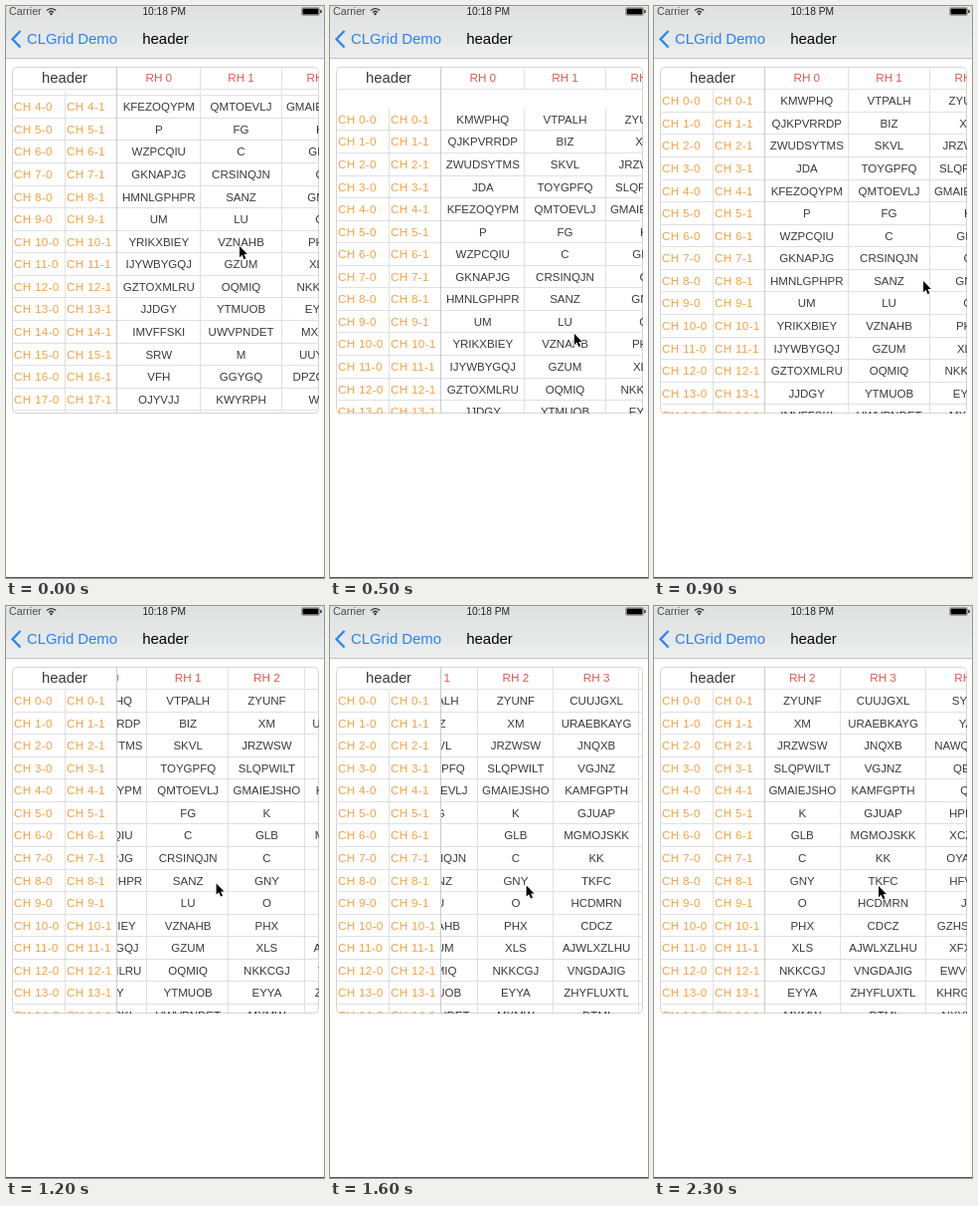
An HTML page with a canvas that plays this animation: 320x574 px, repeating every 2400 ms.

```html
<!DOCTYPE html>
<html lang="en">
<head>
<meta charset="utf-8">
<title>Grid demo</title>
<style>
html, body { margin: 0; width: 100%; height: 100%; overflow: hidden; background: #fff; }
canvas { display: block; width: 320px; height: 574px; }
</style>
</head>
<body>
<canvas id="stage"></canvas>
<script>
const W = 320, H = 574, LOOP = 2400, STEP = 100;
const canvas = document.getElementById('stage');
const ctx = canvas.getContext('2d');
const dpr = window.devicePixelRatio || 1;
canvas.width = W * dpr;
canvas.height = H * dpr;

const FONT = '"Liberation Sans", Arial, sans-serif';
const BLUE = '#2585f3', ORANGE = '#f3a346', RED = '#e2574e', INK = '#3a3a3a', LINE = '#e0e0e0';
const GRID = { x: 6, y: 61, r: 315, b: 409 };
const BODY_X = 112, BODY_Y = 84, ROW = 22.57, ROWS = 18, BASELINE = 15;
const EDGES = [112, 195.5, 277.5, 354, 440, 524];

const COLUMNS = [
  'KMWPHQ QJKPVRRDP ZWUDSYTMS JDA KFEZOQYPM P WZPCQIU GKNAPJG HMNLGPHPR UM YRIKXBIEY IJYWBYGQJ GZTOXMLRU JJDGY IMVFFSKI SRW VFH OJYVJJ',
  'VTPALH BIZ SKVL TOYGPFQ QMTOEVLJ FG C CRSINQJN SANZ LU VZNAHB GZUM OQMIQ YTMUOB UWVPNDET M GGYGQ KWYRPH',
  'ZYUNF XM JRZWSW SLQPWILT GMAIEJSHO K GLB C GNY O PHX XLS NKKCGJ EYYA MXMW UUYGH DPZCKOL WCI',
  'CUUJGXL URAEBKAYG JNQXB VGJNZ KAMFGPTH GJUAP MGMOJSKK KK TKFC HCDMRN CDCZ AJWLXZLHU VNGDAJIG ZHYFLUXTL DTMI',
  'SYGT YAI NAWQPGTB QEJL QJ HPEKJ XCZPJ OYAHW HFVPJ JT GZHSMOW XFXEF EWVGMW KHRGMOW NXYNALT'
].map(s => s.split(' '));

// time, x, y of the pointer tip
const POINTER = [
  [0, 235, 241], [200, 238, 357], [700, 251, 310], [900, 271, 276],
  [1400, 172, 280], [1900, 236, 281], [2300, 226, 281]
];

function scrollY(t) {
  if (t < 200) return 84 * (1 - Math.pow(t / 200, 1.5));
  // rubber band past the top edge
  const s = t - 200;
  return -Math.max(0, 0.82 * s * Math.exp(-s / 120) - 1.4 * Math.min(1, s / 200));
}

function scrollX(t) {
  if (t < 900) return 0;
  if (t < 1400) return 96 * Math.pow((t - 900) / 500, 1.15);
  const u = Math.min(1, (t - 1400) / 900);
  return 166.5 - 70.5 * Math.pow(1 - u, 2.5);
}

function pointerAt(t) {
  let i = 0;
  while (i < POINTER.length - 2 && t > POINTER[i + 1][0]) i++;
  const [t0, x0, y0] = POINTER[i], [t1, x1, y1] = POINTER[i + 1];
  const u = Math.min(1, (t - t0) / (t1 - t0));
  return [x0 + (x1 - x0) * u, y0 + (y1 - y0) * u];
}

function text(s, x, y, size, color, align = 'left', spacing = 0) {
  ctx.font = `${size}px ${FONT}`;
  ctx.letterSpacing = `${spacing}px`;
  ctx.textAlign = align;
  ctx.fillStyle = color;
  ctx.fillText(s, x, y);
}

function hline(x0, x1, y, color = LINE) {
  ctx.fillStyle = color;
  ctx.fillRect(x0, Math.round(y), x1 - x0, 1);
}

function vline(x, y0, y1, color = LINE) {
  ctx.fillStyle = color;
  ctx.fillRect(Math.round(x) - 1, y0, 1, y1 - y0);
}

function clipped(x, y, r, b, draw) {
  ctx.save();
  ctx.beginPath();
  ctx.rect(x, y, r - x, b - y);
  ctx.clip();
  draw();
  ctx.restore();
}

function gridPath() {
  ctx.beginPath();
  ctx.roundRect(GRID.x + 0.5, GRID.y + 0.5, GRID.r - GRID.x - 1, GRID.b - GRID.y - 1, 4);
}

function drawGrid(sx, sy) {
  const top = BODY_Y - sy;
  const bodyTop = Math.max(BODY_Y, top);
  const rowTop = i => top + i * ROW;
  const mid = c => (EDGES[c] + EDGES[c + 1]) / 2 - sx;

  gridPath();
  ctx.strokeStyle = '#d4d4d4';
  ctx.lineWidth = 1;
  ctx.stroke();

  // frozen row titles
  clipped(GRID.x, BODY_Y + 1, BODY_X, GRID.b, () => {
    for (let i = 0; i < ROWS; i++) {
      const y = rowTop(i);
      hline(GRID.x, BODY_X, y + ROW - 1);
      text(`CH ${i}-0`, 8, y + BASELINE, 11.7, ORANGE, 'left', 0.3);
      text(`CH ${i}-1`, 61, y + BASELINE, 11.7, ORANGE, 'left', 0.3);
    }
    vline(60, bodyTop, GRID.b - 1);
  });

  // scrolling cells
  clipped(BODY_X, BODY_Y + 1, GRID.r, GRID.b, () => {
    for (let i = 0; i < ROWS; i++) {
      const y = rowTop(i);
      hline(BODY_X, GRID.r, y + ROW - 1);
      COLUMNS.forEach((col, c) => text(col[i] || '', mid(c), y + BASELINE, 11.5, INK, 'center'));
    }
    EDGES.forEach(x => vline(x - sx, bodyTop, GRID.b - 1));
  });

  // column titles
  clipped(BODY_X, GRID.y, GRID.r, BODY_Y, () => {
    COLUMNS.forEach((_, c) => text(`RH ${c}`, mid(c), 76.3, 11.7, RED, 'center'));
    EDGES.forEach(x => vline(x - sx, GRID.y, BODY_Y));
  });
  text('header', 59, 77.3, 14.8, INK, 'center');
  hline(GRID.x, GRID.r, BODY_Y - 1);
  vline(BODY_X, GRID.y, GRID.b - 1, '#cbcbcb');
}

function drawBar() {
  const g = ctx.createLinearGradient(0, 0, 0, 52);
  g.addColorStop(0, '#e0e2e1');
  g.addColorStop(0.55, '#e5e6e6');
  g.addColorStop(1, '#eeefef');
  ctx.fillStyle = g;
  ctx.fillRect(0, 0, W, 52);
  hline(0, W, 52, '#c2c4c4');

  text('Carrier', 3, 9.3, 10.7, '#4c4c4c');
  text('10:18 PM', 159.2, 9.3, 10.2, '#222', 'center');

  // signal arcs
  ctx.strokeStyle = '#333';
  ctx.lineWidth = 1.4;
  for (const r of [3.2, 6]) {
    ctx.beginPath();
    ctx.arc(45.5, 8.6, r, -Math.PI * 0.77, -Math.PI * 0.23);
    ctx.stroke();
  }
  ctx.fillStyle = '#333';
  ctx.beginPath();
  ctx.arc(45.5, 8, 1.2, 0, Math.PI * 2);
  ctx.fill();

  // battery
  ctx.strokeStyle = '#777';
  ctx.lineWidth = 0.6;
  ctx.beginPath();
  ctx.roundRect(297.5, 1.5, 18, 8, 1.5);
  ctx.stroke();
  ctx.fillStyle = '#000';
  ctx.fillRect(298.5, 2.5, 16, 6);
  ctx.fillRect(316.3, 4, 1.2, 3);

  ctx.strokeStyle = BLUE;
  ctx.lineWidth = 2.2;
  ctx.beginPath();
  ctx.moveTo(14.5, 25);
  ctx.lineTo(6.5, 33.2);
  ctx.lineTo(14.5, 41.4);
  ctx.stroke();
  text('CLGrid Demo', 21, 38.3, 14.9, BLUE);
  text('header', 160.5, 38.3, 15, '#000', 'center');
}

function drawPointer(x, y) {
  const pts = [[0, 0], [0, 11.2], [2.6, 8.8], [4.5, 13.2], [6.4, 12.3], [4.5, 8.1], [7.9, 8.1]];
  ctx.beginPath();
  pts.forEach(([px, py]) => ctx.lineTo(x + px, y + py));
  ctx.closePath();
  ctx.lineJoin = 'round';
  ctx.lineWidth = 1.6;
  ctx.strokeStyle = '#fff';
  ctx.stroke();
  ctx.fillStyle = '#000';
  ctx.fill();
  ctx.lineJoin = 'miter';
}

function render(t) {
  ctx.setTransform(dpr, 0, 0, dpr, 0, 0);
  ctx.fillStyle = '#fff';
  ctx.fillRect(0, 0, W, H);
  drawBar();
  drawGrid(scrollX(t), scrollY(t));
  hline(0, W, H - 1, '#555');
  drawPointer(...pointerAt(t));
}

const start = performance.now();
function tick() {
  const t = (performance.now() - start) % LOOP;
  render(Math.floor(t / STEP) * STEP);
  requestAnimationFrame(tick);
}
tick();
</script>
</body>
</html>
```
